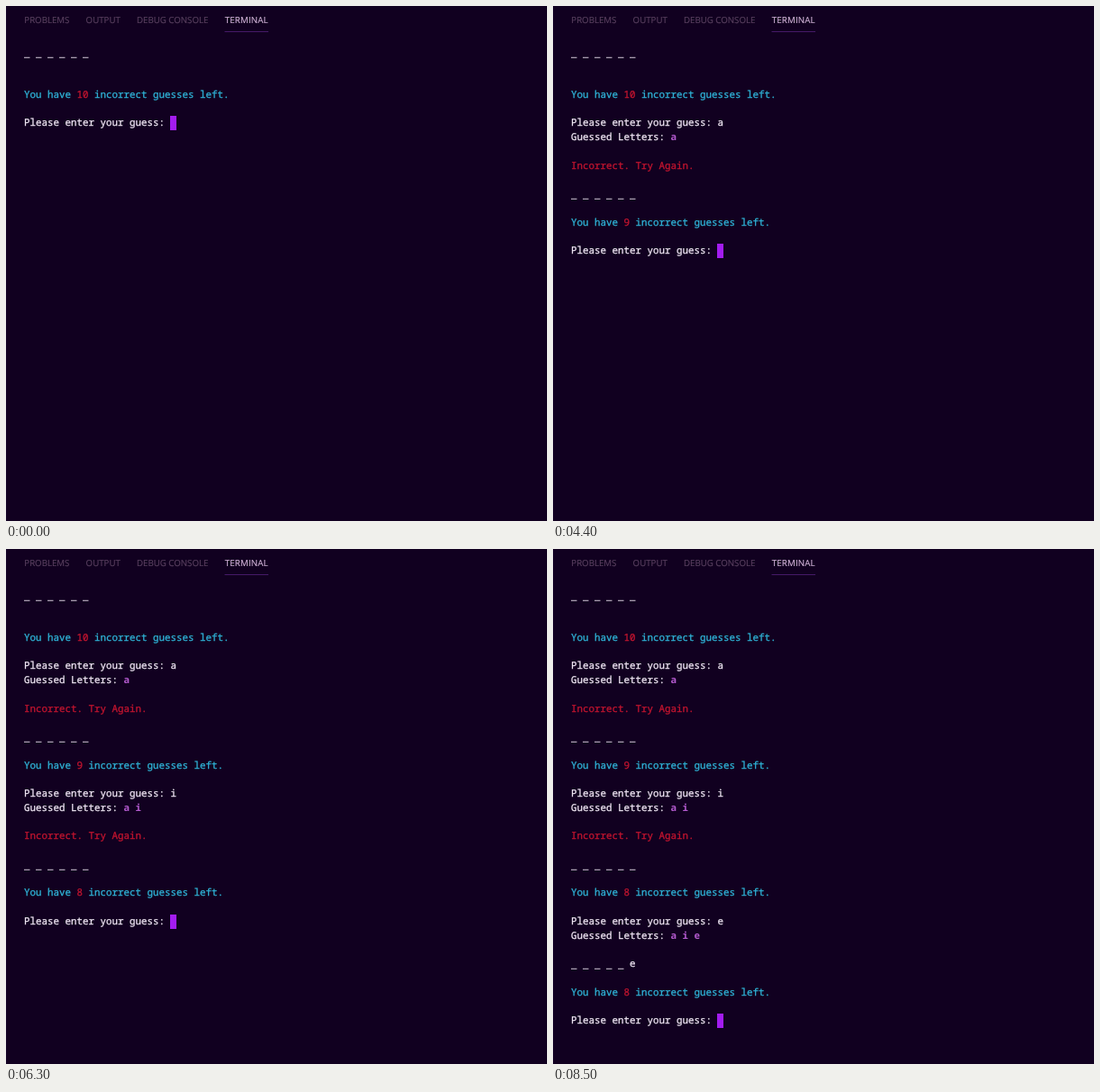
Recreate the animation shown at these times as an HTML page. Size 600 px wide and 572 px high, loop 8.6 s.

```html
<!DOCTYPE html>
<html lang="en">
<head>
<meta charset="utf-8">
<title>Word guessing game in a terminal</title>
<style>
  html, body { margin: 0; width: 100%; height: 100%; overflow: hidden; background: #110020; }
  svg { display: block; width: 600px; height: 572px; }
  text { white-space: pre; text-rendering: geometricPrecision; fill: currentColor; stroke: currentColor; }
  .tab { font: 9.7px "Open Sans", "Noto Sans", sans-serif; color: #59405f; stroke-width: .15px; }
  .active { color: #d3b6d9; }
  .row { font: 10.83px "Noto Sans Mono", "DejaVu Sans Mono", monospace; color: #f0e8f4; stroke-width: .3px; }
  .blank { stroke: none; transform: translateY(1.2px); }
  .info { color: #2fb4d7; }
  .bad { color: #c2142f; }
  .used { color: #b55bd0; font-weight: 700; stroke: none; }
  #cursor { fill: #a31cf0; }
</style>
</head>
<body>
<svg viewBox="0 0 600 572">
  <rect width="600" height="572" fill="#110020"/>
  <rect width="1" height="572" fill="#17062a"/>
  <text class="tab" x="20.3" y="19.4">PROBLEMS</text>
  <text class="tab" x="88.6" y="19.4">OUTPUT</text>
  <text class="tab" x="145" y="19.4">DEBUG CONSOLE</text>
  <text class="tab active" x="242.8" y="19.4" letter-spacing=".15">TERMINAL</text>
  <rect x="242.5" y="28" width="48.5" height="1" fill="#451a68"/>
  <rect id="cursor" width="7" height="16"/>
  <g id="screen"></g>
</svg>
<script>
const LOOP = 8600, CELL = 6.5, LEFT = 20, LINE = 15.75, BASE = 101.8;
const NS = "http://www.w3.org/2000/svg";
const PROMPT = "Please enter your guess: ";
const screen = document.getElementById("screen");
const cursor = document.getElementById("cursor");
const items = [], stops = [];

// Writes styled pieces [text, class] on one row, visible from time `at`.
function write(at, row, ...parts) {
  const g = document.createElementNS(NS, "g");
  let col = 0;
  for (const [str, cls = ""] of parts) {
    const t = document.createElementNS(NS, "text");
    t.setAttribute("class", "row " + cls);
    t.setAttribute("x", LEFT + col * CELL);
    t.setAttribute("y", BASE + row * LINE);
    t.textContent = str;
    g.append(t);
    col += str.length;
  }
  screen.append(g);
  items.push({ at, g });
}

function ask(at, row, left) {
  write(at, row, ["You have ", "info"], [String(left), "bad"], [" incorrect guesses left.", "info"]);
  write(at, row + 2, [PROMPT]);
  stops.push({ at, row: row + 2, col: PROMPT.length });
}

function type(at, row, letter) {
  write(at, row, [" ".repeat(PROMPT.length)], [letter]);
  stops.push({ at, row, col: PROMPT.length + 1 });
}

function guessed(at, row, letters) {
  write(at, row, ["Guessed Letters: "], [letters, "used"]);
}

const BLANKS = ["_ _ _ _ _ _", "blank"];

function miss(at, row, letters, left) {
  guessed(at, row, letters);
  write(at, row + 2, ["Incorrect. Try Again.", "bad"]);
  write(at, row + 4, BLANKS);
  ask(at, row + 6, left);
}

write(0, -3, BLANKS);
ask(0, 0, 10);
type(2500, 2, "a");
miss(2900, 3, "a", 9);
type(5000, 11, "i");
miss(5600, 12, "a i", 8);
type(7500, 20, "e");
guessed(7900, 21, "a i e");
write(7900, 23, ["_ _ _ _ _ ", "blank"], ["e"]);
ask(7900, 25, 8);

function draw() {
  const t = performance.now() % LOOP;
  for (const { at, g } of items) g.style.display = t >= at ? "" : "none";
  const { row, col } = stops.filter(s => s.at <= t).pop();
  cursor.setAttribute("x", Math.floor(LEFT + col * CELL));
  cursor.setAttribute("y", Math.round(BASE + row * LINE - 11.3));
  requestAnimationFrame(draw);
}
draw();
</script>
</body>
</html>
```
